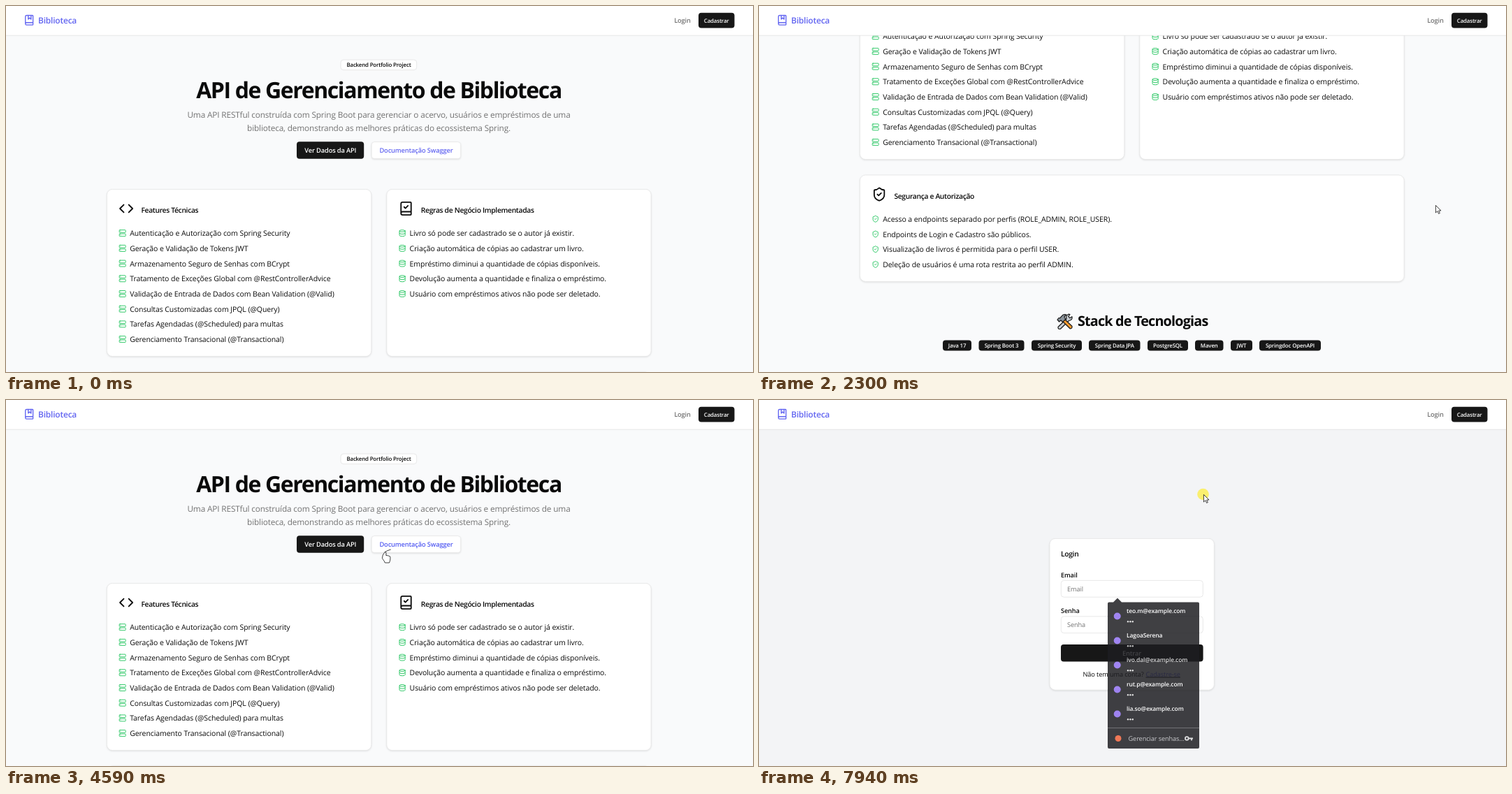
An HTML page for the animation above (8 s loop, 1069x524 px).

```html
<!DOCTYPE html>
<html lang="pt-BR">
<head>
<meta charset="utf-8">
<title>Biblioteca</title>
<style>
html, body { margin: 0; width: 100%; height: 100%; overflow: hidden; background: #f9fafb; }
svg { display: block; width: 1069px; height: 524px; }
text { font-family: "Open Sans", "Noto Sans", sans-serif; fill: #0a0a0a; text-rendering: geometricPrecision; white-space: pre; }
.mid { text-anchor: middle; }
.brand { font-size: 12px; font-weight: 600; letter-spacing: -.22px; fill: #6366f1; }
.hero { font-size: 32px; font-weight: 700; letter-spacing: -1.4px; }
.lead { font-size: 11.8px; letter-spacing: -.15px; fill: #737373; }
.h2 { font-size: 19.8px; font-weight: 700; letter-spacing: -.82px; }
.h3 { font-size: 10.3px; font-weight: 600; letter-spacing: -.33px; }
.item { font-size: 10.5px; letter-spacing: -.07px; }
.btn { font-size: 9.3px; font-weight: 600; letter-spacing: -.15px; }
.tag { font-size: 7.9px; font-weight: 600; letter-spacing: -.17px; }
.label { font-size: 9.1px; font-weight: 600; letter-spacing: -.1px; }
.small { font-size: 9.2px; letter-spacing: -.1px; }
.user { font-size: 8.5px; font-weight: 600; letter-spacing: -.12px; fill: #fff; }
.status { font-size: 7.7px; fill: #eee; }
.white { fill: #fff; }
.gray { fill: #737373; }
.indigo { fill: #6366f1; }
.card { fill: #fff; stroke: #e5e5e5; stroke-width: .8; filter: drop-shadow(0 1px 1px rgba(0,0,0,.1)); }
.box { fill: #fff; stroke: #e2e2e2; stroke-width: .8; }
.dark { fill: #171717; }
.icon { fill: none; stroke-width: 2; stroke-linecap: round; stroke-linejoin: round; }
</style>
</head>
<body>
<svg id="stage" viewBox="0 0 1069 524"></svg>
<script>
const PITCH = 21.7, LOOP = 8000;

const text = (x, y, s, cls, id = '') => `<text x="${x}" y="${y}" class="${cls}" id="${id}">${s}</text>`;
const rect = (x, y, w, h, r, cls, id = '') =>
  `<rect x="${x}" y="${y}" width="${w}" height="${h}" rx="${r}" class="${cls}" id="${id}"/>`;

const BOOK = '<path d="M4 19.5v-15A2.5 2.5 0 0 1 6.5 2H19a1 1 0 0 1 1 1v18a1 1 0 0 1-1 1H6.5a1 1 0 0 1 0-5H20"/>';
const ICONS = {
  bookMark: BOOK + '<path d="M10 2v8l3-3 3 3V2"/>',
  bookCheck: BOOK + '<path d="m9 9.5 2 2 4-4"/>',
  code: '<path d="m16 18 6-6-6-6M8 6l-6 6 6 6"/>',
  server: '<rect x="2" y="2" width="20" height="8" rx="2"/><rect x="2" y="14" width="20" height="8" rx="2"/><path d="M6 6h.01M6 18h.01"/>',
  database: '<ellipse cx="12" cy="5" rx="9" ry="3"/><path d="M3 5v14a9 3 0 0 0 18 0V5M3 12a9 3 0 0 0 18 0"/>',
  shield: '<path d="M20 13c0 5-3.5 7.5-7.66 8.95a1 1 0 0 1-.67-.01C7.5 20.5 4 18 4 13V6a1 1 0 0 1 1-1c2 0 4.5-1.2 6.24-2.72a1.17 1.17 0 0 1 1.52 0C14.51 3.81 17 5 19 5a1 1 0 0 1 1 1zM9 12l2 2 4-4"/>'
};
const icon = (name, cx, cy, size, color) =>
  `<g class="icon" stroke="${color}" transform="translate(${cx} ${cy}) scale(${size / 24}) translate(-12 -12)">${ICONS[name]}</g>`;

function card(x, y, w, h, bigIcon, title, smallIcon, items) {
  const rows = items.map((s, i) => {
    const cy = y + 63 + i * PITCH;
    return icon(smallIcon, x + 22.3, cy - .2, 10.85, '#22c55e') + text(x + 32.8, cy + 3.8, s, 'item');
  });
  return rect(x, y, w, h, 8, 'card') + icon(bigIcon, x + 27.7, y + 27.6, 21.7, '#0a0a0a') +
    text(x + 49, y + 33.8, title, 'h3') + rows.join('');
}

function techTags() {
  const tags = [['Java 17', 263, 41], ['Spring Boot 3', 314.5, 65], ['Spring Security', 390, 72],
    ['Spring Data JPA', 472, 73.5], ['PostgreSQL', 556, 58], ['Maven', 624, 40.5],
    ['JWT', 675, 31], ['Springdoc OpenAPI', 716, 88]];
  return tags.map(([s, x, w]) =>
    rect(x, 760.6, w, 15, 4, 'dark') + text(x + w / 2, 770.9, s, 'tag mid white')).join('');
}

const tools = `<g transform="translate(426 722)" stroke="#1b1b1b" stroke-linejoin="round" stroke-width="1.2">
  <path fill="#c9ced3" d="M2 19.5 14 8Q12.500 3 17 1.200L19 1.500 16.800 4.500 19 6.800 22 4.800Q23 9.500 17.500 10.500L5.500 22.300Q1.500 23.200 2 19.500Z"/>
  <path fill="#f59b2f" d="m8.500 11.500 3-3L22 18.500Q22.500 22 19 21.800Z"/>
  <path fill="#8b949c" d="M1 9 3 6.500 4.500 7 9 2.200Q11.500 1 14 2L10.800 5l2 3.500-4.300 4L6 10 3.500 12Z"/></g>`;

const home = `<g id="home">
  ${rect(479, 77, 108.7, 14.6, 4, 'box')}${text(533.5, 87.4, 'Backend Portfolio Project', 'tag mid')}
  ${text(533.5, 132, 'API de Gerenciamento de Biblioteca', 'hero mid')}
  ${text(533.5, 159.7, 'Uma API RESTful construída com Spring Boot para gerenciar o acervo, usuários e empréstimos de uma', 'lead mid')}
  ${text(533.5, 178.7, 'biblioteca, demonstrando as melhores práticas do ecossistema Spring.', 'lead mid')}
  ${rect(416, 194.3, 96.2, 24.4, 4, 'dark', 'dataBtn')}${text(464.3, 210.2, 'Ver Dados da API', 'btn mid', 'dataText')}
  ${rect(523.2, 194.6, 127.5, 24, 4, 'card')}${text(587, 210.2, 'Documentação Swagger', 'btn mid', 'docsText')}
  ${card(144.4, 262.4, 378.4, 239.2, 'code', 'Features Técnicas', 'server', [
    'Autenticação e Autorização com Spring Security',
    'Geração e Validação de Tokens JWT',
    'Armazenamento Seguro de Senhas com BCrypt',
    'Tratamento de Exceções Global com @RestControllerAdvice',
    'Validação de Entrada de Dados com Bean Validation (@Valid)',
    'Consultas Customizadas com JPQL (@Query)',
    'Tarefas Agendadas (@Scheduled) para multas',
    'Gerenciamento Transacional (@Transactional)'])}
  ${card(544.8, 262.4, 378.4, 239.2, 'bookCheck', 'Regras de Negócio Implementadas', 'database', [
    'Livro só pode ser cadastrado se o autor já existir.',
    'Criação automática de cópias ao cadastrar um livro.',
    'Empréstimo diminui a quantidade de cópias disponíveis.',
    'Devolução aumenta a quantidade e finaliza o empréstimo.',
    'Usuário com empréstimos ativos não pode ser deletado.'])}
  ${card(144.4, 524, 778.8, 152.4, 'shield', 'Segurança e Autorização', 'shield', [
    'Acesso a endpoints separado por perfis (ROLE_ADMIN, ROLE_USER).',
    'Endpoints de Login e Cadastro são públicos.',
    'Visualização de livros é permitida para o perfil USER.',
    'Deleção de usuários é uma rota restrita ao perfil ADMIN.'])}
  ${tools}${text(456, 740, 'Stack de Tecnologias', 'h2')}
  ${techTags()}</g>`;

const login = `<g id="login">
  ${rect(416, 198.4, 235.4, 216.8, 8, 'card')}
  ${text(432, 224, 'Login', 'h3')}
  ${text(432, 254, 'Email', 'label')}${rect(432.3, 258.4, 203, 23.8, 4, 'box', 'email')}${text(441, 273.6, 'Email', 'small gray')}
  ${text(432, 305.3, 'Senha', 'label')}${rect(432.3, 309.8, 203, 23.8, 4, 'box')}${text(441, 325, 'Senha', 'small gray')}
  ${rect(432, 350, 203.6, 24.4, 4, 'dark')}${text(533.5, 365.6, 'Entrar', 'btn mid white')}
  ${text(463.5, 395.6, 'Não tem uma conta?', 'small')}
  <g text-decoration="underline">${text(553.5, 395.6, 'Cadastre-se', 'small indigo')}</g></g>`;

const users = ['teo.m@example.com', 'LagoaSerena', 'ivo.dal@example.com', 'rut.p@example.com', 'lia.so@example.com'];
const popup = `<g id="popup">
  <path fill="#1d1d21" d="M501 289.500H507L513 283.500 519 289.500H628a2 2 0 0 1 2 2V497a2 2 0 0 1-2 2H501a2 2 0 0 1-2-2V291.500a2 2 0 0 1 2-2Z"/>
  ${users.map((s, i) => {
    const y = 302 + 35 * i;
    return `<circle cx="512.7" cy="${y + 7.5}" r="5" fill="#8f6ff0"/>` + text(526, y + 3, s, 'user') +
      [528, 531.4, 534.8].map(x => `<circle cx="${x}" cy="${y + 15.3}" r="1.2" fill="#ddd"/>`).join('');
  }).join('')}
  <path d="M499 469.500H630" stroke="#6a6a6e" stroke-width=".8"/>
  <circle cx="514" cy="484.500" r="4.500" fill="#f0623a"/>
  <text x="528.500" y="488" class="small" style="fill:#c4c4c8">Gerenciar senhas...</text>
  <g fill="none" stroke="#d8d8da" stroke-width="1.800"><circle cx="612.300" cy="484.500" r="2.300"/><path d="M614.600 484.500H621M619 484.500v3"/></g></g>`;

const header = `<rect width="1069" height="42" fill="#fff"/><path d="M0 42.200H1069" stroke="#e5e5e5" stroke-width=".9"/>
  ${icon('bookMark', 33.2, 20.3, 16.3, '#6366f1')}${text(46, 25, 'Biblioteca', 'brand')}
  ${text(968, 24, 'Login', 'btn mid gray')}
  ${rect(991, 9.8, 51.5, 21.6, 4, 'dark')}${text(1016.7, 23.6, 'Cadastrar', 'tag mid white')}`;

const pointer = `<circle id="click" r="8.300" fill="#ffeb00" fill-opacity=".55"/>
  <g id="cursor" stroke="#111" stroke-width=".8" stroke-linejoin="round">
  <path id="arrow" fill="#fff" d="M.4.4V11L2.900 8.700 4.600 12.400 6.300 11.600 4.700 8H8Z"/>
  <path id="hand" fill="#fff" d="M-1.200 1.200Q0-.800 1.200 1.200V5.600Q2.600 4.900 3.400 6 4.700 5.400 5.400 6.500 7.200 6.300 7.200 8.200V11Q7 13.500 5.800 16H-.4Q-1.200 13.500-3.200 11.300L-4.300 9.400Q-4-.2 8-3 8L-1.200 9.800Z"/>
  <path id="beam" fill="none" d="M-2-5.500Q0-5.500 0-4.500 0-5.500 2-5.500M0-4.500V4.500M-2 5.500Q0 5.500 0 4.500 0 5.500 2 5.500"/></g>`;

const $ = id => document.getElementById(id);
$('stage').innerHTML = `<rect id="bg" width="1069" height="524"/>${home}${login}${header}
  <g id="status"><path fill="#1c1c1e" d="M0 512H79a2.500 2.500 0 0 1 2.500 2.500V524H0Z"/>${text(1, 521.3, 'localhost:5173/dados', 'status')}</g>
  ${popup}${pointer}`;

// Bursts of updates: first time, last time, number of updates
const BURSTS = [[0, 0, 1], [170, 590, 7], [720, 720, 1], [920, 1340, 7], [1740, 2300, 9], [2430, 2850, 7],
  [3400, 4170, 12], [4240, 5010, 12], [5080, 5710, 10], [5830, 5830, 1], [5960, 6300, 6],
  [6500, 6570, 2], [6900, 7660, 11], [7730, 7940, 4]];

function snap(t) {
  const [a, b, n] = BURSTS.filter(s => s[0] <= t).pop();
  if (t >= b) return b;
  const step = (b - a) / (n - 1);
  return a + Math.floor((t - a) / step + 1e-6) * step;
}

const SCROLL = [[850, 0], [920, 8], [990, 48], [1060, 120], [1130, 196], [1200, 246], [1270, 273], [1340, 282],
  [2300, 282], [2430, 276], [2500, 254], [2570, 182], [2640, 88], [2710, 26.5], [2780, 5], [2850, 0]];

const MOUSE = [[170, 1026, 464], [380, 985, 335], [520, 968, 255], [590, 969, 239], [720, 974, 247],
  [1670, 974, 247], [2020, 971, 270], [2300, 968, 285], [3330, 968, 285], [3540, 996, 140], [3680, 985, 52],
  [3750, 950, 36], [3900, 820, 80], [4170, 617, 181], [4380, 566, 210], [4590, 542.7, 217], [4800, 540, 216],
  [5010, 513.5, 211], [5360, 484, 210], [5830, 468, 210], [6300, 456.5, 207], [6824, 456.5, 207],
  [7204, 513, 271], [7660, 513, 271], [7730, 548, 222], [7800, 608, 160], [7870, 636, 135]];

function track(points, t, k) {
  const i = points.findIndex(p => p[0] > t);
  if (i < 0) return points[points.length - 1][k];
  if (i === 0) return points[0][k];
  const a = points[i - 1], b = points[i];
  return a[k] + (b[k] - a[k]) * (t - a[0]) / (b[0] - a[0]);
}

const show = (id, on) => { $(id).style.display = on ? '' : 'none'; };
const paint = (id, color) => { $(id).style.fill = color; };

function draw(time) {
  const t = snap(time);
  const x = track(MOUSE, t, 1), y = track(MOUSE, t, 2);
  const onLogin = t >= 6570;
  const inside = (l, r, top, bottom) => x > l && x < r && y > top && y < bottom;
  const onData = !onLogin && inside(416, 512, 194, 219);
  const onDocs = !onLogin && inside(523, 651, 194, 219);
  const onField = onLogin && inside(432, 635, 258, 282);

  show('home', !onLogin);
  show('login', onLogin);
  paint('bg', onLogin ? '#f3f4f6' : '#f9fafb');
  $('home').setAttribute('transform', `translate(0 ${-track(SCROLL, t, 1)})`);
  paint('dataBtn', onData ? '#2e2e2e' : '#171717');
  paint('dataText', onData ? '#535bf2' : '#fff');
  paint('docsText', onDocs ? '#535bf2' : '#6366f1');

  show('status', t >= 5360 && t < 6970);
  const focused = t >= 7280 && t < 7940;
  $('email').style.stroke = focused ? '#a1a1a1' : '';
  $('email').style.strokeWidth = focused ? 1.6 : '';
  show('popup', t >= 7430);
  $('popup').setAttribute('opacity', t >= 7940 ? .845 : 1);

  show('click', (t >= 6500 && t < 6570) || (t >= 7280 && t < 7430) || t >= 7940);
  $('click').setAttribute('transform', `translate(${x - .5} ${y})`);
  show('cursor', t >= 170);
  show('hand', onData || onDocs);
  show('beam', onField);
  show('arrow', !(onData || onDocs || onField));
  $('cursor').setAttribute('transform', `translate(${x} ${y})`);
}

const start = performance.now();
function tick() {
  draw((performance.now() - start) % LOOP);
  requestAnimationFrame(tick);
}
tick();
</script>
</body>
</html>
```
